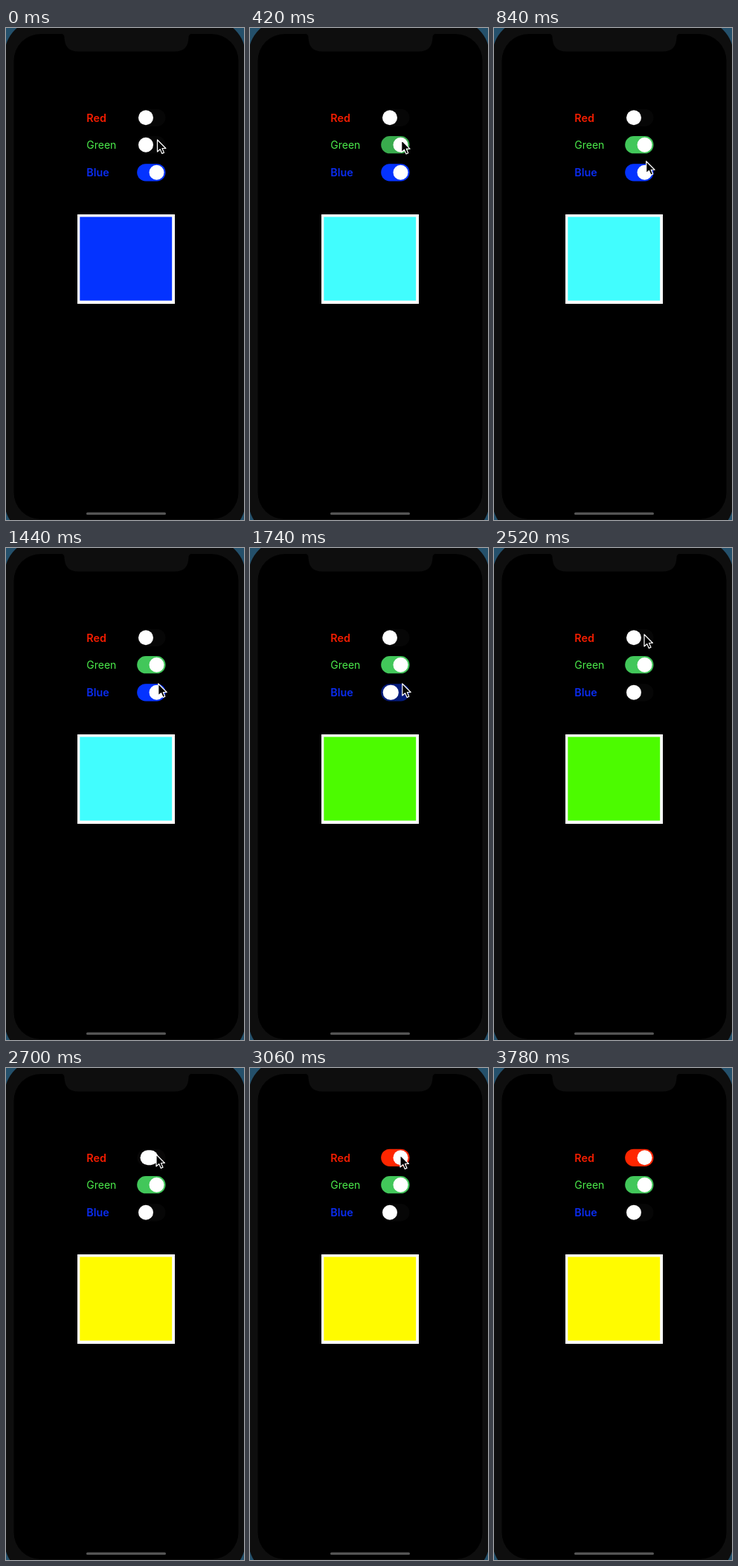
An HTML page for the animation above (4.26 s loop, 320 by 660 pixels).

```html
<!DOCTYPE html>
<html lang="en">
<head>
<meta charset="utf-8">
<title>Color switches</title>
<style>
  html, body { margin: 0; width: 100%; height: 100%; overflow: hidden; background: #000; }
  svg { display: block; width: 100%; height: 100%; }
  text { font: 14px Inter, Roboto, sans-serif; }
  .heavy { font-size: 14.3px; font-weight: 600; }
</style>
</head>
<body>
<svg viewBox="0 0 320 660" preserveAspectRatio="none">
  <rect width="320" height="660" fill="#24506b"/>
  <rect x="-2" y="-11" width="324" height="693" rx="47" fill="#0e0e0e"/>
  <rect x="10.500" y="8" width="302" height="651" rx="36"/>
  <path d="M74 7.500Q78.500 8 78.500 13Q79 31.500 97 31.500H227Q245 31.500 245.500 13Q245.500 8 250 7.500Z" fill="#0e0e0e"/>
  <rect x="108" y="649.800" width="107" height="3.200" rx="1.600" fill="#545454"/>

  <text class="heavy" x="108.300" y="125.800" fill="#f51d00">Red</text>
  <text x="108.300" y="162" fill="#4bea4b">Green</text>
  <text class="heavy" x="108.300" y="199.300" fill="#0a2cf0">Blue</text>
  <g id="switches"></g>

  <rect x="96" y="250" width="131" height="120" fill="#fff"/>
  <rect id="swatch" x="99.300" y="253.400" width="123.900" height="112.300"/>
  <path id="cursor" d="M0 0V16L3.700 12.600L6.300 18.400L9 17.200L6.500 11.500H11.400Z"
        fill="#000" stroke="#fff" stroke-width="1.200" stroke-linejoin="round"/>
</svg>
<script>
const LOOP = 4260, STEP = 60;
const OFF_X = 188, ON_X = 202.5, KNOB = 20, STRETCH = 4;

const clamp = v => Math.min(1, Math.max(0, v));
const ease = v => v * v * (3 - 2 * v);
const ramp = (t, from, to) => ease(clamp((t - from) / (to - from)));
const byId = id => document.getElementById(id);

function add(tag, attrs) {
  const el = document.createElementNS("http://www.w3.org/2000/svg", tag);
  set(el, attrs);
  return byId("switches").appendChild(el);
}

function set(el, attrs) {
  for (const name in attrs) el.setAttribute(name, attrs[name]);
}

// press: finger down, flip: value changes and the knob starts to slide
const switches = [
  { y: 120.3, color: "#ff2600", startsOn: false, press: 2520, flip: 2630 },
  { y: 156.7, color: "#42c75a", startsOn: false, press: 60, flip: 170 },
  { y: 193.8, color: "#0433ff", startsOn: true, press: 1440, flip: 1550 }
];

for (const s of switches) {
  const track = { x: 176.2, y: s.y - 11.6, width: 38.3, height: 23.2, rx: 11.6 };
  add("rect", { ...track, fill: "#060606" });
  s.track = add("rect", { ...track, fill: s.color });
  s.knob = add("rect", { y: s.y - KNOB / 2, height: KNOB, rx: KNOB / 2, fill: "#fff" });
}

// index bits: red 1, green 2, blue 4
const mixes = ["#000", "#ff2600", "#4cfb00", "#fffb00", "#0433ff", "#ff40ff", "#41fdfe", "#fff"];

// [start, end, x, y] of each pointer move
const moves = [
  [0, 240, 203.7, 150.6],
  [600, 900, 204.8, 182],
  [1980, 2340, 205, 116],
  [2340, 2520, 202, 116],
  [2760, 3060, 202, 117],
  [3480, 3780, 200, 668]
];

function drawSwitch(s, t) {
  const slide = ramp(t, s.flip, s.flip + 220);
  const fade = ramp(t, s.flip + 60, s.flip + 310);
  const flipped = v => s.startsOn ? 1 - v : v;
  const wide = STRETCH * ramp(t, s.press, s.press + 100) * (1 - ramp(t, s.flip + 100, s.flip + 240));
  const pos = flipped(slide);
  const center = OFF_X + (ON_X - OFF_X) * pos;
  set(s.knob, { x: center - KNOB / 2 - wide * pos, width: KNOB + wide });
  set(s.track, { opacity: flipped(fade) });
}

function draw(t) {
  let mix = 0;
  switches.forEach((s, i) => {
    drawSwitch(s, t);
    if ((t >= s.flip) !== s.startsOn) mix |= 1 << i;
  });
  set(byId("swatch"), { fill: mixes[mix] });

  let x = 203.5, y = 150;
  for (const [from, to, toX, toY] of moves) {
    const k = ramp(t, from, to);
    x += (toX - x) * k;
    y += (toY - y) * k;
  }
  set(byId("cursor"), { transform: `translate(${x} ${y})` });
}

const start = performance.now();
function tick() {
  const t = (performance.now() - start) % LOOP;
  draw(Math.floor(t / STEP) * STEP);
  requestAnimationFrame(tick);
}
tick();
</script>
</body>
</html>
```
